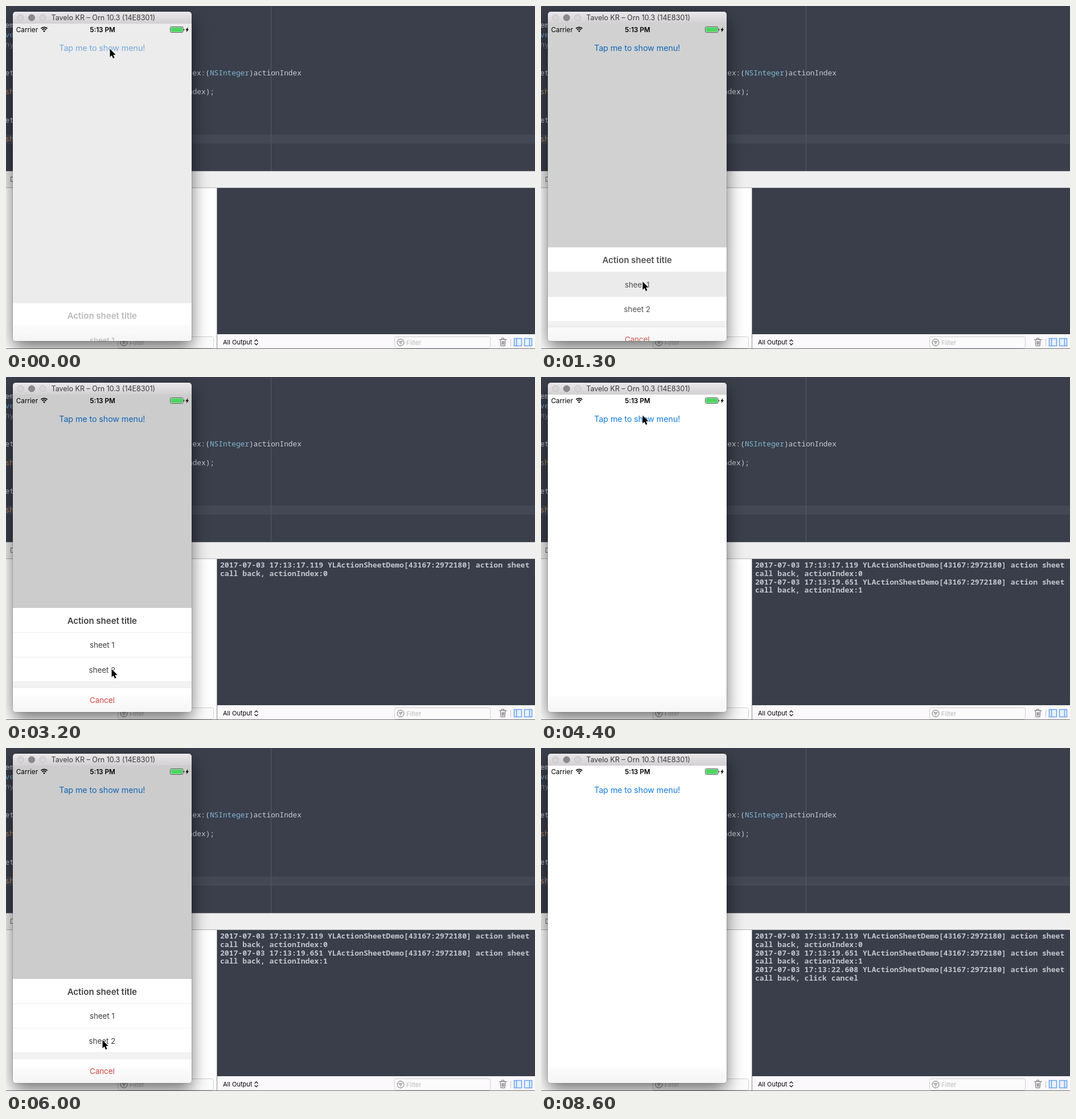
An HTML page that plays this animation: 929x603 px, repeating every 9300 ms.

```html
<!DOCTYPE html>
<html lang="en">
<head>
<meta charset="utf-8">
<title>Action sheet demo</title>
<style>
  html, body { margin: 0; width: 100%; height: 100%; overflow: hidden; background: #3a3f4b; }
  svg { display: block; font-family: Inter, "Open Sans", sans-serif; }
  text { white-space: pre; }
  .mid { text-anchor: middle; }
  .code { font: 12.77px "Noto Sans Mono", monospace; fill: #c9ccd3; }
  .log { font: 700 13.13px "Noto Sans Mono", monospace; fill: #c3c6cd; }
  .status { font-size: 11.7px; fill: #000; }
  .row { font-size: 13.4px; letter-spacing: -.05px; fill: #404040; text-anchor: middle; }
  .bar { font-size: 11px; }
  .hint { fill: #b9b9b9; }
  .icon { fill: none; stroke: #6b6b6b; }
</style>
</head>
<body>
<svg width="929" height="603" viewBox="0 0 929 603">
  <defs>
    <linearGradient id="titleFill" x2="0" y2="1">
      <stop stop-color="#eae8ea"/><stop offset="1" stop-color="#d2d0d2"/>
    </linearGradient>
    <linearGradient id="footFill" x2="0" y2="1">
      <stop stop-opacity=".01"/><stop offset="1" stop-opacity=".04"/>
    </linearGradient>
    <filter id="blur" x="-30%" y="-30%" width="160%" height="160%">
      <feGaussianBlur stdDeviation="15"/>
    </filter>
    <clipPath id="screen"><path d="M12 31H326V584a5 5 0 0 1-5 5H17a5 5 0 0 1-5-5z"/></clipPath>
    <g id="filterField">
      <rect x=".5" y=".5" width="168" height="20" rx="3" fill="#fcfbfc" stroke="#cfcdcf"/>
      <circle class="icon" cx="11" cy="10.5" r="6"/>
      <path class="icon" d="M7.5 8.5h7M8.5 10.8h5M9.8 13h2.4"/>
      <text class="bar hint" x="21" y="14.5">Filter</text>
    </g>
  </defs>

  <!-- editor -->
  <rect width="929" height="290" fill="#3a3f4b"/>
  <rect y="226" width="929" height="16" fill="#434854"/>
  <rect x="465" width="1" height="290" fill="#555a65"/>
  <g class="code">
    <text x="-1.5" y="38">em</text>
    <text x="-1.5" y="55" fill="#7ba6cf">ve</text>
    <text x="-1.5" y="72" fill="#8a8f99">ny</text>
    <text x="-1.5" y="122">et</text>
    <text x="327.3" y="122">ex:(<tspan fill="#83b9cf">NSInteger</tspan>)actionIndex</text>
    <text x="-1.5" y="155" fill="#c08c6c">sh</text>
    <text x="320" y="155">ndex);</text>
    <text x="-1.5" y="205">et</text>
    <text x="-1.5" y="238" fill="#c08c6c">sh</text>
  </g>

  <!-- debug area -->
  <rect y="290" width="929" height="29" fill="#f0eff0"/>
  <rect y="290" width="929" height="1" fill="#b3b4b8"/>
  <rect x="8.5" y="300.5" width="9" height="8" class="icon"/>
  <rect y="319" width="371" height="284" fill="#fff"/>
  <rect x="371" y="319" width="558" height="258" fill="#393e4a"/>
  <rect x="371" y="577" width="558" height="26" fill="#fcf9fc"/>
  <rect x="370" y="319" width="1" height="284" fill="#8a8b90"/>
  <rect y="319" width="929" height="1" fill="#b4b3b6"/>
  <use href="#filterField" x="196" y="581"/>
  <use href="#filterField" x="682" y="581"/>
  <text class="bar" x="381" y="595">All Output</text>
  <path d="M436.5 589.7l3-3 3 3M436.5 592.8l3 3 3-3" fill="none" stroke="#222" stroke-width="1.3"/>
  <path class="icon" d="M866.5 586.5h13M870.5 586v-2h4v2M868 587l1 10.5h7l1-10.5M870.8 589l.4 6.5M872.7 589v6.5M874.6 589l-.4 6.5"/>
  <rect x="886" y="585" width="1" height="13" fill="#c4c2c4"/>
  <g fill="#e8f1fd" stroke="#6aa5ee" stroke-width="1.6">
    <path d="M892.5 584.5h13v13h-13zM896.5 584.5v13"/>
    <path d="M910.5 584.5h13v13h-13zM919.5 584.5v13"/>
  </g>
  <rect y="602" width="929" height="1" fill="#6b6a6e"/>
  <g id="logs" class="log"></g>

  <!-- simulator window -->
  <rect x="12" y="22" width="314" height="579" rx="6" filter="url(#blur)" opacity=".55"/>
  <rect x="11.5" y="9.5" width="315" height="580" rx="5.5" fill="none" stroke="#000" stroke-opacity=".14"/>
  <path d="M12 31V15a5 5 0 0 1 5-5H321a5 5 0 0 1 5 5V31z" fill="url(#titleFill)"/>
  <g stroke="#c0bec0" fill="#d7d5d7">
    <circle cx="25.5" cy="20.5" r="5.5"/>
    <circle cx="45" cy="20.5" r="5.5" fill="#8b898b" stroke="#7f7d7f"/>
    <circle cx="64.5" cy="20.5" r="5.5"/>
  </g>
  <text x="79.5" y="25" font-size="12.5" fill="#3b3a3b">Tavelo KR – Orn 10.3 (14E8301)</text>

  <g clip-path="url(#screen)">
    <rect x="12" y="31" width="314" height="558" fill="#fff"/>
    <text id="button" class="mid" x="168.8" y="79" font-size="14.3" letter-spacing="-.1" fill="#147de1">Tap me to show menu!</text>
    <rect id="dim" x="12" y="31" width="314" height="558"/>
    <g class="status">
      <text x="17.8" y="45.8">Carrier</text>
      <text x="147.3" y="45.8" font-weight="600">5:13 PM</text>
      <path d="M61.4 39.6a8 8 0 0 1 11.2 0M63.4 42a5 5 0 0 1 7.2 0" fill="none" stroke="#000" stroke-width="1.7"/>
      <path d="M67 46l-2-2.2a3 3 0 0 1 4 0z"/>
      <rect x="288.5" y="36.5" width="22.5" height="10" rx="2" fill="#fff" stroke="#333" stroke-width=".8"/>
      <rect x="289.5" y="37.5" width="20.5" height="8" rx="1" fill="#4cd562"/>
      <path d="M312 39.8a2 2 0 0 1 0 3.6zM319.8 37l-4.6 5.2h2.4l-1 4 4.6-5.4h-2.6z"/>
    </g>
    <g id="sheet">
      <rect x="12" width="314" height="183" fill="#fff"/>
      <rect id="press" x="12" width="314" height="44" fill="#ecebec"/>
      <g id="items">
        <path d="M12 43.5H326M12 86.5H326" stroke="#ededed"/>
        <rect x="12" y="129.5" width="314" height="11" fill="#f2f2f2"/>
        <path d="M12 130H326M12 140H326" stroke="#e9e9e9"/>
        <text class="mid" x="168.8" y="27.5" font-size="15" font-weight="600" fill="#404040">Action sheet title</text>
        <text class="row" x="168.8" y="70.3">sheet 1</text>
        <text class="row" x="168.8" y="113.6">sheet 2</text>
        <text class="row" x="168.8" y="166.6" style="fill:#d2453f">Cancel</text>
      </g>
    </g>
    <rect x="12" y="560" width="314" height="29" fill="url(#footFill)"/>
  </g>

  <path id="cursor" d="M0 0V14.2L3.3 11.2 5.6 16.4 8 15.4 5.8 10.2H10.2z" stroke="#fff" stroke-width="1" paint-order="stroke"/>
</svg>

<script>
const LOOP = 9300, STEP = 100, OPEN = 250, CLOSE = 200;
const SHEET = { bottom: 589, height: 183 };
const $ = id => document.getElementById(id);

// press: button touched, show: sheet rises, pick: row touched, hide: sheet falls
const cycles = [
  { press: -50, show: -3, pick: 1200, hide: 1259, row: 43 },
  { press: 2600, show: 2628, pick: 3800, hide: 3800, row: 86.5 },
  { press: 5100, show: 5128, pick: 6700, hide: 6705, row: null }
];

const logs = [
  [1400, "17.119", "actionIndex:0"],
  [3900, "19.651", "actionIndex:1"],
  [6900, "22.608", "click cancel"]
];

// time, x, y of the pointer tip
const path = [
  [200, 182, 75], [400, 184, 130], [700, 180, 420], [1000, 178, 484],
  [1400, 178, 484], [1900, 194, 200], [2100, 199, 92], [2200, 198, 74], [2300, 196, 79],
  [2800, 196, 79], [3100, 186, 480], [3200, 185, 513], [3500, 184, 518], [3600, 183, 518],
  [4100, 183, 518], [4300, 180, 160], [4400, 178, 67], [4500, 176, 45], [4600, 173, 56], [4800, 180, 72],
  [5200, 180, 72], [5500, 172, 460], [5700, 169, 506], [5900, 169, 506], [6000, 169, 513],
  [6200, 149, 572], [6300, 153, 585], [6500, 173, 567],
  [8000, 173, 567], [8300, 161, 537], [8400, 161, 537], [8500, 87, 381]
];
const CURSOR_GONE = 8600;

const ease = k => (1 - Math.cos(Math.PI * Math.min(1, Math.max(0, k)))) / 2;

const entries = logs.map(([at, sec, message], i) => {
  const group = document.createElementNS("http://www.w3.org/2000/svg", "g");
  [`2017-07-03 17:13:${sec} YLActionSheetDemo[43167:2972180] action sheet`, `call back, ${message}`]
    .forEach((line, j) => {
      const text = document.createElementNS(group.namespaceURI, "text");
      text.setAttribute("x", 376);
      text.setAttribute("y", 335 + (i * 2 + j) * 14.8);
      text.textContent = line;
      group.append(text);
    });
  $("logs").append(group);
  return { at, group };
});

function cursorAt(t) {
  const i = path.findIndex(p => p[0] >= t);
  if (i < 0) return path[path.length - 1].slice(1);
  if (i === 0) return path[0].slice(1);
  const [t0, x0, y0] = path[i - 1], [t1, x1, y1] = path[i];
  const k = (t - t0) / (t1 - t0);
  return [x0 + (x1 - x0) * k, y0 + (y1 - y0) * k];
}

function show(el, on) {
  el.style.visibility = on ? "visible" : "hidden";
}

function draw(t) {
  const c = cycles.filter(c => c.press <= t).pop();
  const rise = ease((t - c.show) / OPEN);
  const p = rise * (1 - ease((t - c.hide) / CLOSE));

  $("button").style.opacity = 0.3 + 0.7 * rise;
  $("dim").style.opacity = 0.2 * p;
  $("items").style.opacity = p;
  $("sheet").setAttribute("transform", `translate(0 ${SHEET.bottom - SHEET.height * p})`);
  show($("sheet"), p > 0.001);

  const pressed = c.row !== null && t >= c.pick && p > 0.001;
  $("press").setAttribute("y", c.row || 0);
  $("press").style.opacity = pressed ? 1 : 0;

  for (const { at, group } of entries) show(group, t >= at);

  const [x, y] = cursorAt(t);
  $("cursor").setAttribute("transform", `translate(${x + 0.5} ${y + 0.5})`);
  show($("cursor"), t < CURSOR_GONE);
}

const start = performance.now();
function tick() {
  const t = (performance.now() - start) % LOOP;
  draw(Math.max(STEP, Math.floor(t / STEP) * STEP));
  requestAnimationFrame(tick);
}
tick();
</script>
</body>
</html>
```
